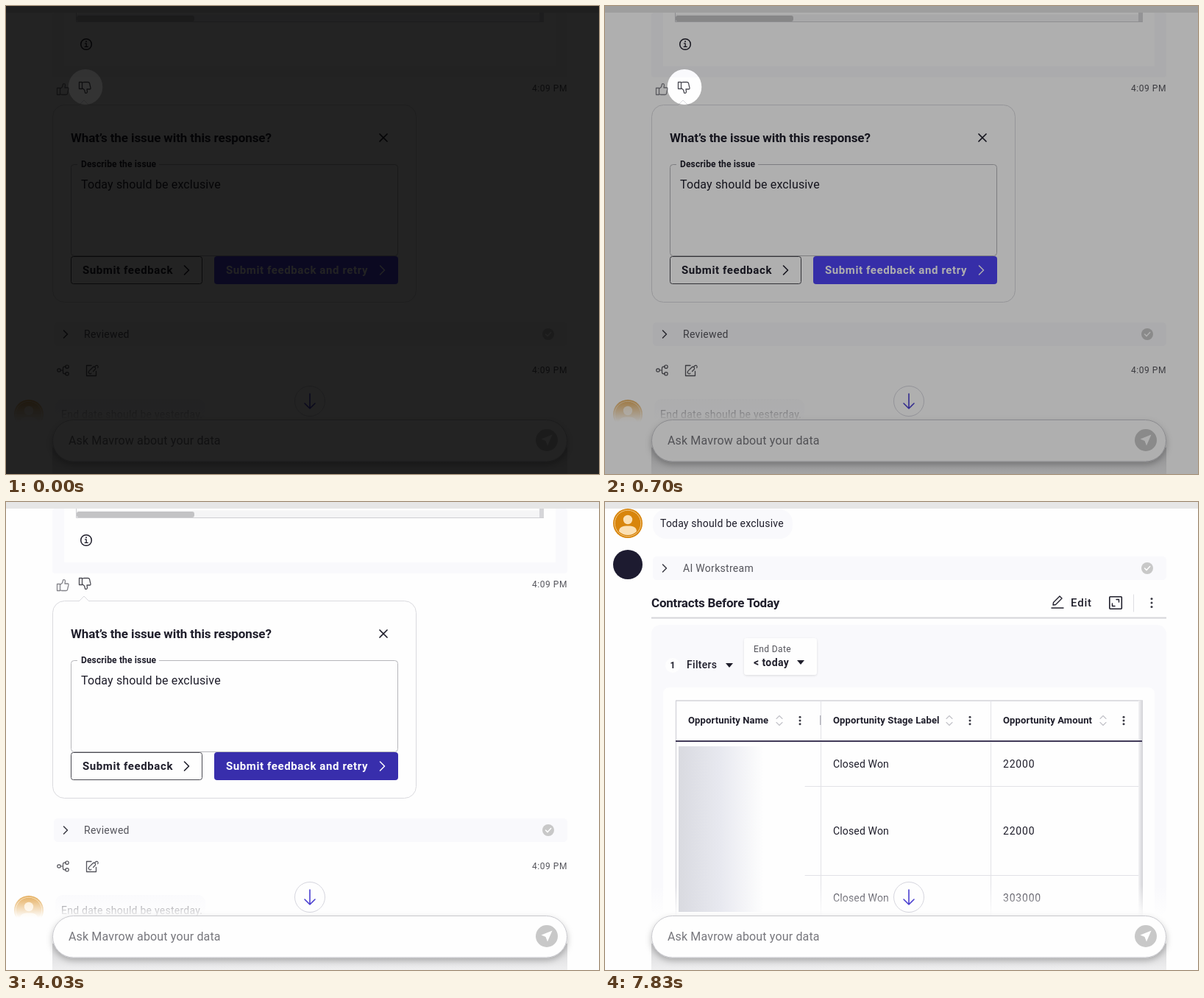
Recreate the animation shown at these times as an HTML page. Size 806 px wide and 636 px high, loop 8000 ms.

```html
<!DOCTYPE html>
<html lang="en">
<head>
<meta charset="utf-8">
<title>Feedback and retry</title>
<style>
  html, body { margin: 0; width: 100%; height: 100%; overflow: hidden; background: #fefefe; }
  svg { display: block; width: 806px; height: 636px; }
  text { font-family: Roboto, "Noto Sans", sans-serif; white-space: pre; }
  .line { fill: none; stroke-linecap: round; stroke-linejoin: round; }
</style>
</head>
<body>
<svg id="stage" viewBox="0 0 806 636"></svg>
<script>
const LOOP = 8000;
const INK = '#1f1e2b', GREY = '#55555c', PALE = '#f9f9fc', WHITE = '#fefefe';

const text = (x, y, str, size, gap, fill = INK, weight = 400) =>
  `<text x="${x}" y="${y}" font-size="${size}" letter-spacing="${gap}" fill="${fill}" font-weight="${weight}">${str}</text>`;
const rect = (x, y, w, h, fill, r = 0, extra = '') =>
  `<rect x="${x}" y="${y}" width="${w}" height="${h}" rx="${r}" fill="${fill}" ${extra}/>`;
const line = (d, stroke = INK, width = 1.5) =>
  `<path class="line" d="${d}" stroke="${stroke}" stroke-width="${width}"/>`;
const disc = (x, y, r, fill, extra = '') =>
  `<circle cx="${x}" cy="${y}" r="${r}" fill="${fill}" ${extra}/>`;
const ring = (x, y, r, stroke, width) =>
  disc(x, y, r, 'none', `stroke="${stroke}" stroke-width="${width}"`);

const chevron = (x, y, h, stroke, width) =>
  line(`M${x} ${y - h}l${h} ${h}l${-h} ${h}`, stroke, width);
const caret = (x, y) => `<path d="M${x - 5} ${y - 3}h10l-5 6z" fill="${INK}"/>`;
const dots = (x, y, step = 5) => [-step, 0, step].map(d => disc(x, y + d, 1.5, '#3a3a44')).join('');
const sorter = (x, y) => line(`M${x - 4} ${y - 2.5}l4 -4l4 4m0 5l-4 4l-4 -4`, '#c2c2c8', 1.1);

const status = (y, label) =>
  rect(65, y - 16, 698, 32, PALE, 5) + chevron(78.5, y, 5, '#3a3a44', 1.5) +
  text(106, y + 5, label, 14, .3, GREY) +
  disc(737, y, 8, '#c8c8c8') + line(`M733.5 ${y}l2.6 2.6l4.6 -5`, WHITE, 1.5);

const avatar = y => `<g transform="translate(31 ${y})">` +
  disc(0, 0, 20, '#d8850c') + ring(0, 0, 17.8, '#f3c987', 1) + disc(0, -5, 6.2, '#fbe0b4') +
  '<path d="M-12 11C-12 5 -7 3.5 0 3.5S12 5 12 11Q7 16 0 16T-12 11z" fill="#fbe0b4"/></g>';

const thumb = 'M-7.5 -1.5h4v9h-4zM-3.5 -.5l3 -2.5l1.2 -4.2q2.4 -.8 2.8 1.6l-.5 3.6h4.2q1 .2 .8 1.6l-1.5 6.6q-.4 1.3 -2 1.3h-6l-2 -1';
const thumbIcon = (x, y, flip, stroke) =>
  `<g transform="translate(${x} ${y}) scale(1 ${flip})">${line(thumb, stroke, 1.3)}</g>`;

const formPage = () =>
  rect(63, 9, 700, 88, PALE, 4) + rect(79, 9, 668, 73, WHITE) +
  rect(95, 9, 636, 12.5, '#f5f5f6') + rect(95, 9, 636, 2.5, WHITE) +
  rect(725, 9, 6, 12, '#d6d6d9') +
  line('M95.5 9.5v12h635', '#cfcfd3', 1) + rect(96, 13, 160, 8, '#c3c3c5', 3) +
  ring(109, 52, 7.3, INK, 1.5) + line('M107.5 50.8h1.7v4.6m-2 0h4', INK, 1.3) + disc(109, 48.2, 1, INK) +
  thumbIcon(77, 113, 1, '#85858b') + thumbIcon(107, 111, -1, '#4c4c54') +
  text(715, 116, '4:09 PM', 12, .55, GREY) +
  rect(63.5, 134.5, 494, 268, WHITE, 16, 'stroke="#dadade"') +
  `<path d="M99 135l7 -7l7 7" fill="${WHITE}" stroke="#dadade"/>` +
  text(88, 185, 'What’s the issue with this response?', 17, -.1, INK, 600) +
  line('M508 174l10 10m0 -10l-10 10', INK, 1.7) +
  rect(88.5, 215.5, 444, 124, 'none', 4, 'stroke="#b6b6ba"') + rect(97, 213, 111, 5, WHITE) +
  text(102, 219, 'Describe the issue', 12, .15, INK, 600) +
  text(102, 248, 'Today should be exclusive', 16, .15) +
  rect(88.5, 340.5, 178, 37, WHITE, 3, 'stroke="#4a4a52"') +
  text(104, 364, 'Submit feedback', 15, .6, INK, 600) + chevron(242.5, 359, 6, INK, 1.6) +
  '<rect id="retry" x="283" y="340" width="250" height="38" rx="4"/>' +
  text(299, 364, 'Submit feedback and retry', 15, .6, WHITE, 600) + chevron(508.5, 359, 6, WHITE, 1.5) +
  status(446, 'Reviewed') +
  line('M74.5 495h3m4 -4.8h-2q-2 0 -2 2v5.6q0 2 2 2h2', GREY, 1.2) +
  [[72, 495], [83, 490.2], [83, 499.8]].map(p => ring(...p, 2.2, GREY, 1.2)).join('') +
  line('M116 488.5h-6.500v14h13v-6', GREY, 1.3) +
  line('M115.500 493.500l2.500 -2.500a2 2 0 0 1 3 3l-2.500 2.500m2 -6l2 -2a2 2 0 0 1 2.200 3.200m-10 2.500l-1.800 2a2 2 0 0 0 3 3', GREY, 1.2) +
  text(715, 499, '4:09 PM', 12, .55, GREY) +
  rect(67, 534, 204, 40, PALE, 10) + avatar(555) +
  text(75, 560, 'End date should be yesterday.', 14, .25);

const heads = [[113, 'Opportunity Name', 237, 265], [310, 'Opportunity Stage Label', 468, 496],
               [541, 'Opportunity Amount', 677, 705]];
const rows = [[361, '22000'], [452, '22000'], [543, '303000']];

const tablePage = () =>
  avatar(29) + rect(65, 10, 190, 40, PALE, 18) + text(75, 34, 'Today should be exclusive', 14, .2) +
  disc(31, 85, 20, '#1d1b30') + status(90, 'AI Workstream') +
  text(63, 143, 'Contracts Before Today', 17, -.22, INK, 600) +
  line('M609 140l.5 -3.500l8.500 -8.500l3 3l-8.500 8.500zM607 144h16', INK, 1.4) +
  text(633, 142, 'Edit', 15, .8, INK, 500) +
  rect(685.8, 128.8, 16.500, 16.500, 'none', 1, `stroke="${INK}" stroke-width="1.6"`) +
  line('M695 132.500h3.500v3.500m-9 2v3.500h3.500', INK, 1.4) +
  line('M718.5 126v23', '#dedee2', 1) + dots(743, 137, 5.5) +
  rect(63, 156.5, 700, 2, '#d5d5da') +
  rect(63, 167, 700, 395, PALE, 12) +
  disc(92, 222, 10, WHITE) + text(88.5, 226, '1', 12, 0, INK, 600) +
  text(111, 226, 'Filters', 14, .3, INK, 500) + caret(169, 222) +
  rect(189, 185, 99, 50, WHITE, 4, 'filter="url(#soft)"') +
  text(202, 204, 'End Date', 12, .4, GREY) + text(202, 223, '&lt; today', 14, .4, INK, 600) + caret(266, 218) +
  rect(79, 252, 668, 310, WHITE, 8) +
  line('M96.500 562v-292h634', '#d3d3d9', 1.3) + rect(725, 270, 6, 292, 'url(#edge)') +
  line('M293.500 270v292M524.500 270v292M272 386.500h453M272 507.500h453', '#e2e2e7', 1) +
  rect(96, 324, 634, 2, '#413a58') + rect(292, 290, 1.5, 13, '#b4b4bc') +
  heads.map(([x, label, s, d]) => text(x, 301, label, 13, .14, INK, 600) + sorter(s, 297) + dots(d, 297, 4.7)).join('') +
  rows.map(([y, sum]) => text(310, y, 'Closed Won', 14, .15) + text(541, y, sum, 14, .8)).join('');

const footer = () =>
  disc(413, 537, 20.5, WHITE, 'stroke="#d6d6de"') +
  line('M413 527v20m-7 -7l7 7l7 -7', '#4a3fd0', 1.6) +
  rect(63, 600, 700, 36, 'url(#base)') +
  rect(63.5, 562.5, 699, 56.5, WHITE, 28, 'stroke="#c9c9ce" filter="url(#lift)"') +
  text(85, 596, 'Ask Mavrow about your data', 16, .15, '#77777d') +
  disc(735, 590, 15, '#c8c8c8') +
  `<path d="M742.500 582.500l-15 6l6 2.500l2.500 6.500z" fill="${WHITE}"/>`;

const stage = document.getElementById('stage');
stage.innerHTML = `<defs>
  <linearGradient id="fade" x2="0" y2="1"><stop stop-color="${WHITE}" stop-opacity="0"/><stop offset="1" stop-color="${WHITE}"/></linearGradient>
  <linearGradient id="edge"><stop stop-color="#f3f3f5"/><stop offset="1" stop-color="#d2d2d6"/></linearGradient>
  <linearGradient id="base" x2="0" y2="1"><stop stop-color="#d4d4d6"/><stop offset="1" stop-color="#efeff0"/></linearGradient>
  <linearGradient id="blur"><stop stop-color="#d9dae0"/><stop offset=".5" stop-color="#e8e9f0"/><stop offset="1" stop-color="${WHITE}"/></linearGradient>
  <filter id="soft" x="-20%" y="-20%" width="140%" height="150%"><feDropShadow dx="0" dy="1" stdDeviation="1.5" flood-opacity=".12"/></filter>
  <filter id="lift" x="-5%" y="-20%" width="110%" height="170%"><feDropShadow dx="0" dy="4" stdDeviation="4" flood-opacity=".25"/></filter>
</defs>
${rect(0, 0, 806, 636, WHITE)}
<g id="form">${formPage()}</g><g id="table">${tablePage()}</g>
${rect(0, 520, 806, 45, 'url(#fade)')}${rect(0, 565, 806, 71, WHITE)}
<g id="hidden">${rect(100, 332, 116, 225, 'url(#blur)')}</g>
${rect(0, 0, 806, 9, '#e6e6e6')}${footer()}
<path id="spot" fill-rule="evenodd"/>
<rect id="black" width="806" height="636"/>`;

const [form, table, hidden, retry, spot, black] =
  ['form', 'table', 'hidden', 'retry', 'spot', 'black'].map(id => document.getElementById(id));

const ramp = (t, from, to) => Math.min(1, Math.max(0, (t - from) / (to - from)));
const mix = (a, b, k) => `rgb(${a.map((v, i) => Math.round(v + (b[i] - v) * k))})`;
const hole = (x, y, rx, ry) =>
  `M0 0H806V636H0zM${x - rx} ${y}a${rx} ${ry} 0 1 0 ${2 * rx} 0a${rx} ${ry} 0 1 0 ${-2 * rx} 0z`;
const THUMB_SPOT = hole(108, 110, 23.3, 24), RETRY_SPOT = hole(408.5, 359.3, 136, 51.3);
const CUT = 6835;

function draw(t) {
  const after = t >= CUT;
  form.style.display = after ? 'none' : '';
  table.style.display = hidden.style.display = after ? '' : 'none';
  retry.setAttribute('fill', mix([79, 67, 244], [56, 46, 172], ramp(t, 3770, 3830)));

  const early = t < 3000;
  const dim = after ? 0 : early ? 1 - ramp(t, 1940, 2160) : ramp(t, 4030, 4200);
  spot.setAttribute('d', early ? THUMB_SPOT : RETRY_SPOT);
  spot.setAttribute('opacity', .315 * dim);

  // Scenes dip to black and back
  const light = after ? ramp(t, CUT, CUT + 160) : Math.min(ramp(t, -30, 125), 1 - ramp(t, CUT - 160, CUT));
  black.setAttribute('opacity', 1 - light);
}

function tick() {
  draw(performance.now() % LOOP);
  requestAnimationFrame(tick);
}
tick();
</script>
</body>
</html>
```
